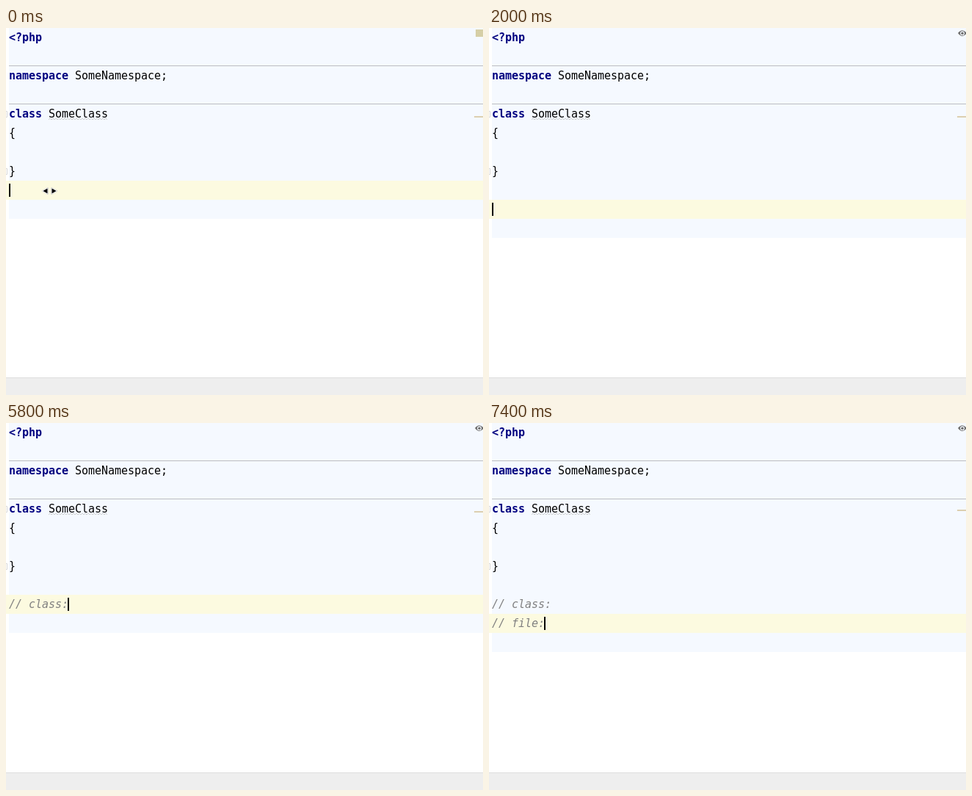
An HTML page with a canvas that plays this animation: 650 by 500 pixels, repeating every 8 s.

```html
<!DOCTYPE html>
<html lang="en">
<head>
<meta charset="utf-8">
<title>Typing comments in an editor</title>
<style>
html, body { margin: 0; width: 100%; height: 100%; overflow: hidden; background: #fff; }
canvas { display: block; }
</style>
</head>
<body>
<canvas id="stage" width="650" height="500"></canvas>
<script>
const ctx = document.getElementById('stage').getContext('2d');
const LOOP = 8000, ROW = 26, CHAR = 9, LEFT = 4;
const MONO = '15px "DejaVu Sans Mono", monospace';

// Each key: [time, row, text of that row]
const typing = [
  [0, 8, ''], [2000, 9, ''],
  [2700, 9, '/'], [2800, 9, '//'], [2900, 9, '// '], [3200, 9, '// c'],
  [3700, 9, '// cl'], [3800, 9, '// cls'], [3900, 9, '// clsa'], [4000, 9, '// clsas'],
  [4600, 9, '// clsa'], [4800, 9, '// cls'], [4900, 9, '// cl'], [5000, 9, '// cla'],
  [5200, 9, '// class'], [5800, 9, '// class:'],
  [6200, 10, ''], [6500, 10, '/'], [6600, 10, '//'], [6700, 10, '// '],
  [7000, 10, '// f'], [7100, 10, '// fi'], [7200, 10, '// fil'], [7400, 10, '// file:']
];
const caretOff = [[300, 1100], [1600, 1900], [2600, 2700]];

function rect(x, y, w, h, color) {
  ctx.fillStyle = color;
  ctx.fillRect(x, y, w, h);
}

function text(str, row, column = 0, style = '', color = '#000') {
  ctx.font = style + ' ' + MONO;
  ctx.fillStyle = color;
  [...str].forEach((ch, i) => ctx.fillText(ch, LEFT + (column + i) * CHAR, row * ROW + 18));
}

const keyword = (str, row) => text(str, row, 0, 'bold', '#000080');

function comment(str, row) {
  if (str.startsWith('//')) text(str, row, 0, 'italic', '#808080');
  else text(str, row);
}

function squiggle(x1, x2, y, color) {
  ctx.beginPath();
  for (let x = x1; x <= x2; x += 2) ctx.lineTo(x, y + ((x - x1) % 4 ? 0 : 2));
  ctx.strokeStyle = color;
  ctx.lineWidth = 0.8;
  ctx.stroke();
}

function foldMark(y) {
  ctx.strokeStyle = '#d8d8d8';
  ctx.lineWidth = 1;
  ctx.strokeRect(-4.5, y + 0.5, 6, 8);
}

function eye() {
  ctx.fillStyle = '#6e6e6e';
  ctx.beginPath();
  ctx.moveTo(639, 7);
  ctx.quadraticCurveTo(645, -0.5, 651, 7);
  ctx.quadraticCurveTo(645, 15, 639, 7);
  ctx.fill();
  for (const [r, color] of [[2.9, '#f5f9ff'], [1.7, '#6e6e6e']]) {
    ctx.fillStyle = color;
    ctx.beginPath();
    ctx.arc(645, 7.2, r, 0, 2 * Math.PI);
    ctx.fill();
  }
}

function resizePointer() {
  for (const side of [-1, 1]) {
    ctx.beginPath();
    ctx.moveTo(59.5 + side * 9, 222);
    ctx.lineTo(59.5 + side * 3, 218.5);
    ctx.lineTo(59.5 + side * 3, 225.5);
    ctx.closePath();
    ctx.lineJoin = 'round';
    ctx.lineWidth = 2.5;
    ctx.strokeStyle = '#bbb';
    ctx.stroke();
    ctx.lineWidth = 1.5;
    ctx.strokeStyle = '#fff';
    ctx.stroke();
    ctx.fillStyle = '#000';
    ctx.fill();
  }
}

function textPointer() {
  rect(62, 215, 7, 3, '#fff');
  rect(62, 229, 7, 3, '#fff');
  rect(64, 217, 3, 13, '#fff');
  rect(63, 216, 2, 1, '#222');
  rect(66, 216, 2, 1, '#222');
  rect(65, 217, 1, 13, '#222');
  rect(63, 230, 2, 1, '#222');
  rect(66, 230, 2, 1, '#222');
}

function draw(t) {
  const [, row, line] = typing.findLast(key => key[0] <= t);
  rect(0, 0, 650, 500, '#fff');
  rect(LEFT, 0, 646, (row + 2) * ROW, '#f5f9ff');
  rect(0, row * ROW, 650, ROW, '#fcfae0');
  rect(LEFT, 51, 646, 1, '#bcbec0');
  rect(LEFT, 103, 646, 1, '#bcbec0');
  foldMark(113);
  foldMark(191);

  keyword('<?php', 0);
  keyword('namespace', 2);
  text('SomeNamespace;', 2, 10);
  keyword('class', 4);
  text('SomeClass', 4, 6);
  squiggle(58, 139, 123, '#c4c6c8');
  text('{', 5);
  text('}', 7);
  if (row === 10) comment('// class:', 9);
  comment(line, row);
  if (t >= 4100 && t < 4900) {
    const end = t < 4400 ? 67 : LEFT - 1 + line.length * CHAR;
    squiggle(31, end, 253.5, '#b3bfa8');
  }

  if (t < 2000) rect(640, 2, 10, 10, '#d6cfa6');
  else eye();
  rect(638, row === 10 ? 118 : 120, 12, 2, '#dccfb0');

  if (!caretOff.some(([from, to]) => t >= from && t < to)) {
    const x = line ? LEFT - 1 + line.length * CHAR : LEFT;
    rect(x, row * ROW + 4, 2, 18, '#000');
  }
  if (t < 300) resizePointer();
  else if (t < 2000) textPointer();

  rect(0, 476, 650, 24, '#eee');
  rect(0, 476, 650, 1, '#dedede');
}

const start = performance.now();
function frame() {
  draw((performance.now() - start) % LOOP);
  requestAnimationFrame(frame);
}
frame();
</script>
</body>
</html>
```
